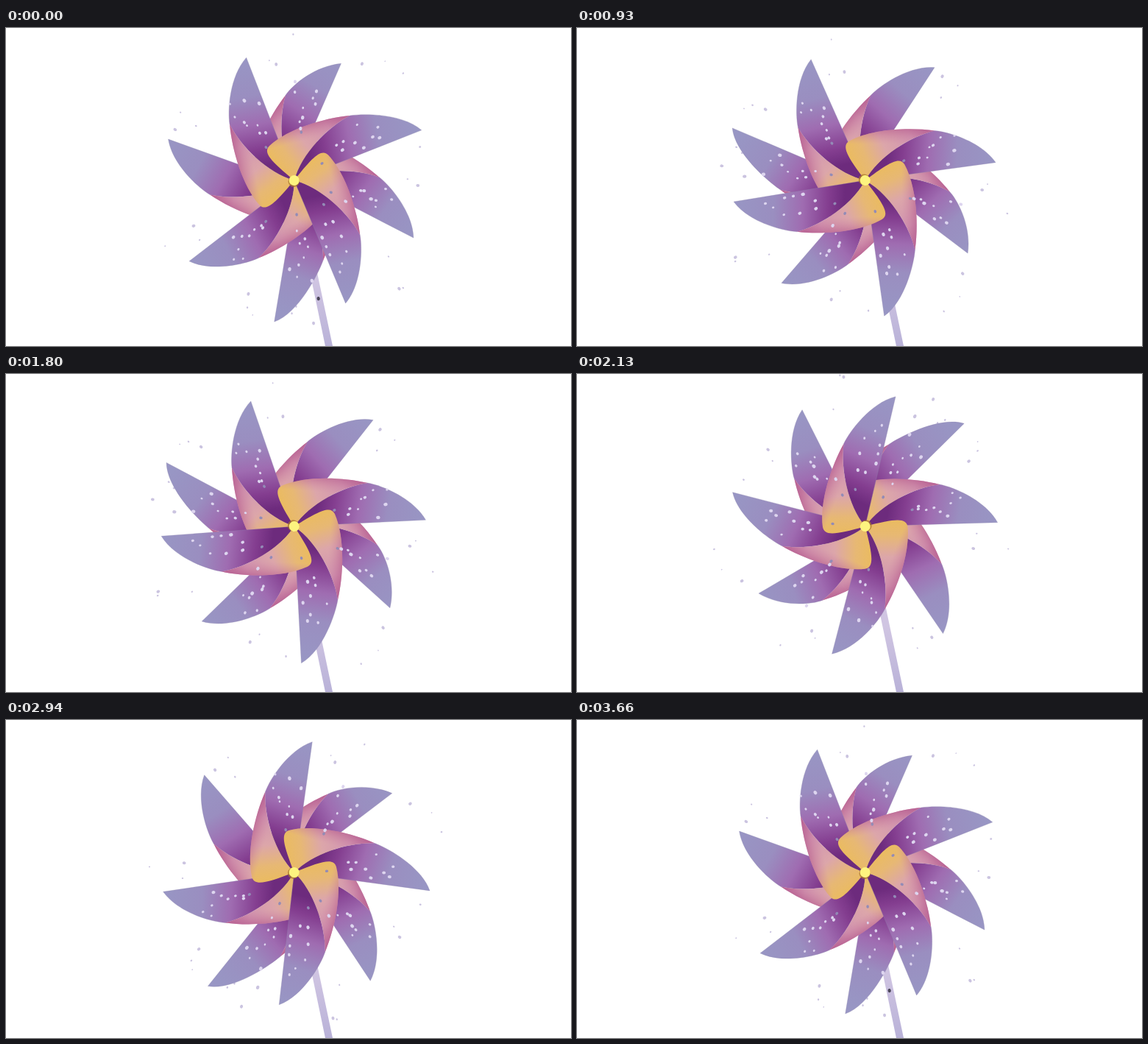
An HTML page that plays this animation: 768 by 432 pixels, repeating every 3750 ms.

```html
<!DOCTYPE html>
<html lang="en">
<head>
<meta charset="utf-8">
<title>Pinwheel</title>
<style>
  html, body { margin: 0; width: 100%; height: 100%; overflow: hidden; background: #fff; }
  svg { display: block; width: 768px; height: 432px; }
</style>
</head>
<body>
<svg viewBox="0 0 768 432">
  <defs>
    <!-- blades are drawn from the hub at 0,0 with the tip along +x -->
    <linearGradient id="petal" gradientUnits="userSpaceOnUse" x1="180" y1="0" x2="33" y2="-28">
      <stop offset="0" stop-color="#9896c4"/>
      <stop offset=".36" stop-color="#9a8ec0"/>
      <stop offset=".62" stop-color="#9f6cb1"/>
      <stop offset=".85" stop-color="#843e90"/>
      <stop offset="1" stop-color="#6d2b7d"/>
    </linearGradient>
    <linearGradient id="fold" gradientUnits="userSpaceOnUse" x1="98" y1="-54" x2="-13" y2="-24">
      <stop offset="0" stop-color="#b9689c"/>
      <stop offset=".25" stop-color="#d194b0"/>
      <stop offset=".58" stop-color="#dca6aa"/>
      <stop offset=".83" stop-color="#e7b874"/>
      <stop offset="1" stop-color="#eabb62"/>
    </linearGradient>
    <linearGradient id="rim" gradientUnits="userSpaceOnUse" x1="45" y1="-66" x2="42" y2="-44">
      <stop offset="0" stop-color="#b55a8c" stop-opacity=".7"/>
      <stop offset="1" stop-color="#cf86a4" stop-opacity="0"/>
    </linearGradient>
    <linearGradient id="wood" x1="0" y1="0" x2="0" y2="1">
      <stop offset=".6" stop-color="#d0c5e2"/>
      <stop offset="1" stop-color="#b9b2d8"/>
    </linearGradient>
    <path id="curl" d="M102.7 -54C70 -51 22 -30 0 0C-20 -36 -26 -51 -14 -56C18 -68 68 -64 102.7 -54Z"/>
    <g id="loose"></g>
    <path id="rod" d="M387 207L396.5 207L444 432L434 432Z"/>
    <clipPath id="onRod"><use href="#rod"/></clipPath>
  </defs>

  <g class="spin"><use href="#loose" fill="#cbc4e0"/></g>
  <use href="#rod" fill="url(#wood)"/>
  <g clip-path="url(#onRod)"><g class="spin"><use href="#loose" fill="#4b4658"/></g></g>
  <g class="spin">
    <g id="blades"></g>
    <g id="specks"></g>
    <circle cx="-.5" cy="1.4" r="7.7" fill="#a9792c" fill-opacity=".75"/>
    <circle r="7" fill="#fdf47f"/>
  </g>
</svg>
<script>
const NS = 'http://www.w3.org/2000/svg';
const $ = id => document.getElementById(id);

function add(parent, tag, attrs) {
  const el = parent.appendChild(document.createElementNS(NS, tag));
  for (const k in attrs) el.setAttribute(k, attrs[k]);
  return el;
}

let seed = 11;
function rand(min, max) {
  seed = (seed * 16807) % 2147483647;
  return min + (max - min) * seed / 2147483647;
}

function addBlade(angle, reach, root) {
  const g = add($('blades'), 'g', { transform: `rotate(${angle})` });
  add(g, 'path', {
    d: `M${reach} 0L0 ${root}L0 0C22 -30 70 -51 102.7 -54C121 -50 ${reach - 16} -31 ${reach} 0Z`,
    fill: 'url(#petal)', stroke: '#8d86ad', 'stroke-opacity': .5, 'stroke-width': .6
  });
  add(g, 'use', { href: '#curl', fill: 'url(#fold)' });
  add(g, 'use', { href: '#curl', fill: 'url(#rim)' });
}

function addDot(parent, angle, dist, size, fill) {
  const dot = add(parent, 'ellipse', {
    cx: dist, rx: size * 1.1, ry: size * .9, transform: `rotate(${angle})`
  });
  if (fill) dot.setAttribute('fill', fill);
}

// [tip angle, tip radius], in painting order
const back = [[198.1, 180], [98, 194], [25.7, 180], [-68.1, 171]];
const front = [[142.4, 180], [-111.3, 179], [-21.5, 186], [67.3, 181]];
for (const [angle, reach] of back) addBlade(angle, reach, -5);
for (const [angle, reach] of front) addBlade(angle, reach, 0);

addDot($('loose'), 78.4, 164, 2.4);
for (const [angle] of [...back, ...front]) {
  for (let i = 0; i < 3; i++)
    addDot($('loose'), angle + rand(5, 24), rand(150, 208), i ? rand(.8, 1.4) : 2.2);
  if (angle === back[0][0]) continue; // one blade stays plain
  for (let i = 0; i < 9; i++)
    addDot($('specks'), angle - rand(3, 24), 72 + i * 8 + rand(-4, 4), rand(1.4, 2.5), '#ddd5ef');
  addDot($('specks'), angle - rand(5, 30), rand(42, 70), 2, '#938bb6');
}

// [tick, angle]; the wheel swings back and forth, eased between keys
const LOOP = 3750, TICK = 30;
const keys = [[0, 0], [48, -360], [72, -143], [99.8, -333.1], [122, 0]];

function angleAt(ms) {
  const n = Math.min(122, Math.floor(ms % LOOP / TICK));
  const i = Math.max(1, keys.findIndex(k => n <= k[0]));
  const [n0, a0] = keys[i - 1], [n1, a1] = keys[i];
  const u = (n - n0) / (n1 - n0);
  return a0 + (a1 - a0) * u * u * (3 - 2 * u);
}

const spinners = document.querySelectorAll('.spin');
const start = performance.now();

function draw() {
  const turn = angleAt(performance.now() - start).toFixed(3);
  for (const g of spinners) g.setAttribute('transform', `translate(391.7 207) rotate(${turn})`);
  requestAnimationFrame(draw);
}
draw();
</script>
</body>
</html>
```
